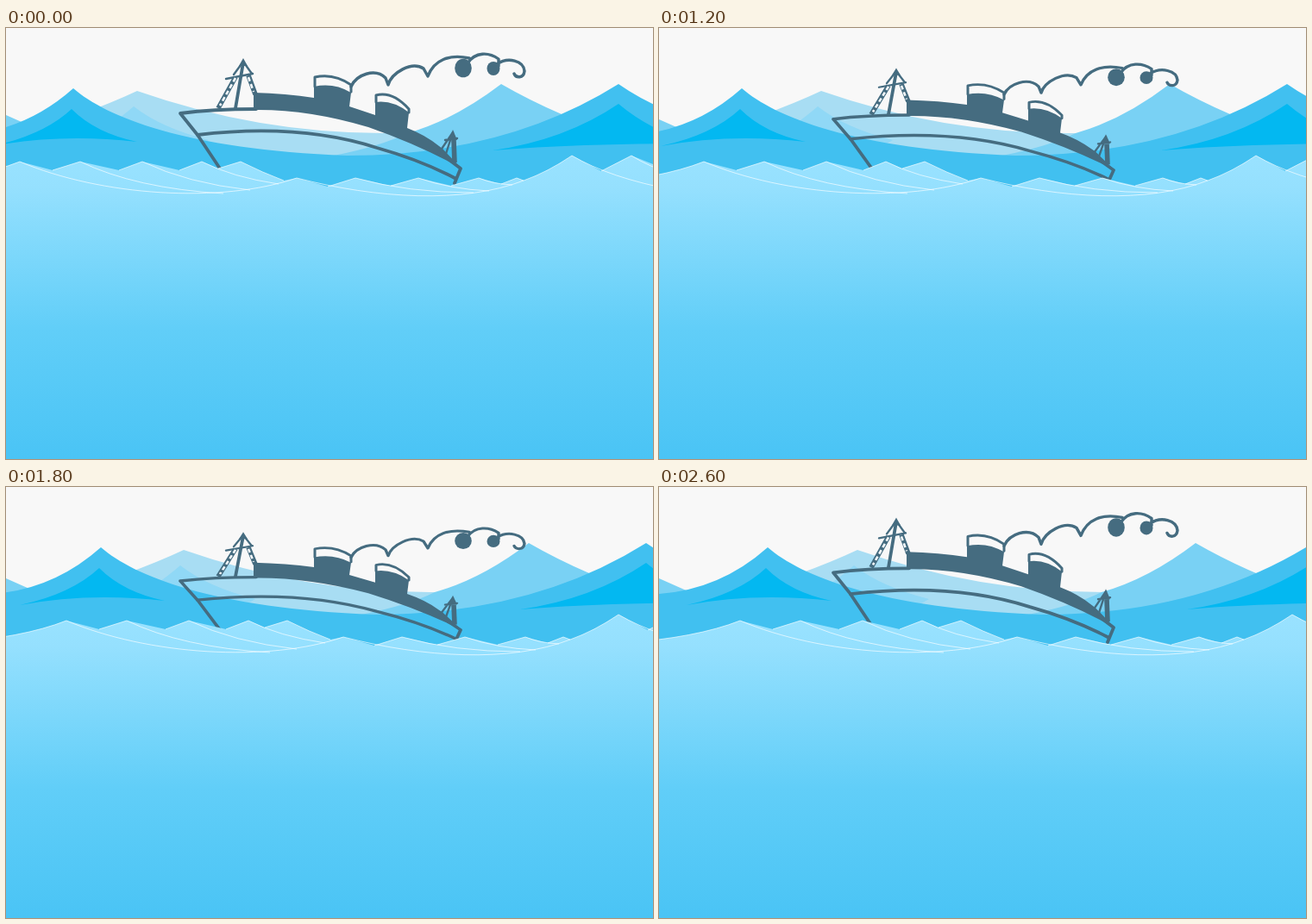
An HTML page without scripts for the animation above (2.8 s loop, 750 px wide and 500 px high).

```html
<!DOCTYPE html>
<html lang="en">
<head>
<meta charset="utf-8">
<title>Ship on waves</title>
<style>
  html, body { margin: 0; width: 100%; height: 100%; overflow: hidden; background: #f8f8f8; }
  svg { display: block; width: 750px; height: 500px; }
  .drift { animation: drift 2.8s steps(14) infinite; }
  @keyframes drift { to { transform: translateX(84px); } }
  .swell { fill: #41c0f0; }
  .crest { fill: #03b8f1; }
  .pale { fill: #79d1f4; }
  .haze { fill: #a8ddf3; }
  .ripples { fill: none; stroke: #fff; stroke-opacity: .65; stroke-width: 1; }
  .ink { fill: #456c80; }
  .line { fill: none; stroke: #456c80; stroke-width: 3.8; stroke-linecap: round; stroke-linejoin: round; }
  .thin { stroke-width: 2.4; }
  .post { stroke-width: 5.6; stroke-linecap: butt; }
  .rung { fill: none; stroke: #f4f8fa; stroke-width: 2.6; stroke-dasharray: 5 3.5; }
</style>
</head>
<body>
<svg viewBox="0 0 750 500">
  <defs>
    <linearGradient id="sea" gradientUnits="userSpaceOnUse" x1="0" y1="150" x2="0" y2="500">
      <stop offset="0" stop-color="#99e2ff"/>
      <stop offset=".1" stop-color="#95e0fe"/>
      <stop offset=".57" stop-color="#61cef8"/>
      <stop offset="1" stop-color="#4ac4f5"/>
    </linearGradient>
  </defs>

  <!-- far waves -->
  <g class="drift">
    <path class="haze" d="M0,128 Q90,102 152,73 Q292,122 437,122 H500 V160 H0Z"/>
    <path fill="#90d8f6" d="M85,135 Q124,112 148,91 Q180,116 235,130 L200,150 H85Z"/>
  </g>
  <path class="pale" d="M0,101 L45,121 V145 H0Z">
    <animateTransform attributeName="transform" type="translate" dur="2.8s" repeatCount="indefinite"
      calcMode="discrete" keyTimes="0;.4286" values="0 0;0 5"/>
  </path>

  <!-- middle waves -->
  <g>
    <animateTransform attributeName="transform" type="translate" dur="2.8s" repeatCount="indefinite"
      calcMode="discrete" values="0;2;4;7;10;14;18;22;27;32;36;40;44;48"/>
    <path class="pale" d="M380,148 Q435,137 465,122 Q519,107 574,65 Q640,103 720,128 V160 H380Z"/>
    <path class="swell" d="M-150,132 Q-90,130 -48,124 Q23,119 78,70 C116,103 208,141 395,148 Q578,148 710,65 Q760,100 830,115 V220 H-150Z"/>
    <path class="crest" d="M-16,137 Q44,124 76,94 Q104,122 152,132 Q63,122 -16,137Z"/>
    <path class="crest" d="M564,142 Q648,130 710,88 Q748,120 800,134 Q660,134 564,142Z"/>
  </g>

  <!-- ship, bobbing as a vertical squeeze about its keel -->
  <g transform="translate(0 187)"><g>
    <animateTransform attributeName="transform" type="scale" dur="2.8s" repeatCount="indefinite"
      calcMode="discrete"
      values="1 1;1 .924;1 .88;1 .842;1 .845;1 .886;1 .924;1 1.003;1 .924;1 .886;1 .861;1 .858;1 .899;1 .997"/>
    <g transform="translate(0 -187)">
      <!-- hull -->
      <path class="line" d="M290,94 Q240,94 202,99 L222,124 L258,178"/>
      <path class="line" d="M222,124 Q340,110 430,139 Q480,153 520,174"/>
      <path class="line" d="M502,144 L527,163 L520,180"/>
      <path class="ink" d="M287,95 V75 Q325,76 357,81 V68 Q380,63 400,75 L398,91 L428,101 V86 Q448,83 467,98 L465,116 Q486,124 502,137 L506,140 L528,163 Q480,136 420,115 Q350,94 287,95Z"/>
      <!-- funnel rims -->
      <path class="line" style="stroke-width:3" d="M358,68 V57 Q380,52 400,66 V74 M429,86 V78 Q448,73 467,94 V98"/>

      <!-- smoke -->
      <path class="line" style="stroke-width:3.4" d="M400,68 C406,54 428,46 440,58 L443,66 C447,52 470,38 484,47 L489,56 C496,37 514,30 537,35 M535,41 C544,27 560,28 571,36 V44 M569,42 C582,33 600,38 601,50 C600,59 591,58 589,53"/>
      <ellipse class="ink" cx="530" cy="46.5" rx="9.8" ry="10.8"/>
      <ellipse class="ink" cx="565" cy="47" rx="7.5" ry="8"/>

      <!-- fore mast -->
      <path class="line thin" d="M275,39 L264,54 M275,39 L285,53 M255,59 L286,53"/>
      <path class="ink" d="M275,35 L280,44 H270Z"/>
      <path class="line" d="M275,40 L266,93"/>
      <path class="line post" d="M266,57 L246,93 M281,55 L289,77"/>
      <path class="rung" d="M266,58 L248,90 M281,57 L287,74"/>

      <!-- aft mast -->
      <path class="line thin" d="M518,121 L501,146 M517,124 L509,149 M509,130 L523,128"/>
      <path class="line post" d="M519,130 L520,156"/>
      <path class="ink" d="M518,118 L523,130 H513Z"/>
    </g>
  </g></g>

  <!-- near water -->
  <g class="drift">
    <path fill="url(#sea)" d="M-120,181 Q-35,175 16,155 L54,165 L86,155 L131,165 L158,155 L201,165 L227,155 L246,163 L272,155 Q298,168 322,177 L337,174 L373,184 L405,174 L446,183 L478,174 L516,183 L548,174 L574,181 L592,174 L600,177 Q628,167 656,148 L690,166 L725,148 L775,168 V510 H-120Z"/>
    <g class="ripples">
      <path d="M-120,181 Q-35,175 16,155 C110,195 250,204 337,174 C430,198 530,204 600,177 Q628,167 656,148 Q700,174 775,188"/>
      <path d="M54,165 L86,155 Q150,186 252,192 M131,165 L158,155 Q210,180 283,188 M201,165 L227,155 Q262,173 316,181 M246,163 L272,155 Q298,168 322,177"/>
      <path d="M373,184 L405,174 Q465,191 542,191 M446,183 L478,174 Q515,187 560,189 M516,183 L548,174 Q565,181 587,182 M574,181 L592,174 L600,177"/>
      <path d="M690,166 L725,148 Q745,161 775,170"/>
    </g>
  </g>
</svg>
</body>
</html>
```
